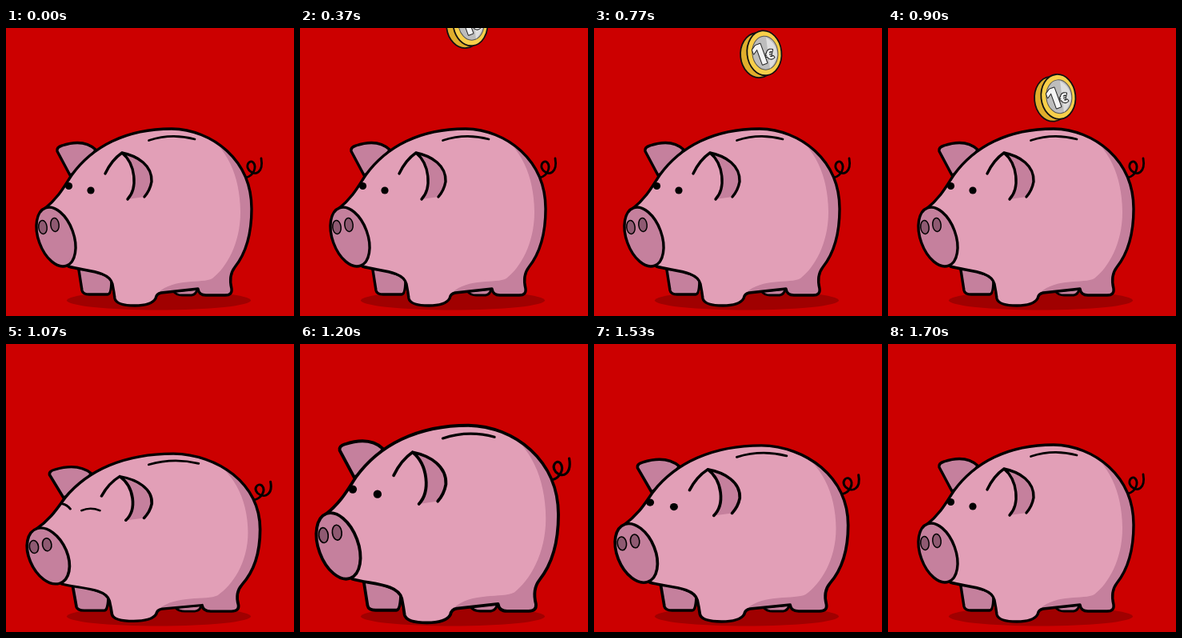
An HTML page that plays this animation: 360x360 px, repeating every 1.81 s.

```html
<!DOCTYPE html>
<html lang="en">
<head>
<meta charset="utf-8">
<title>Piggy bank</title>
<style>
  html, body { margin: 0; width: 100%; height: 100%; overflow: hidden; background: #cc0000; }
  svg { display: block; width: 100vw; height: 100vh; }
  .ink { stroke: #000; stroke-width: 3.4; stroke-linecap: round; stroke-linejoin: round; }
  .thin { stroke-width: 2.8; }
  .line { fill: none; }
  .skin { fill: #e29fb7; }
  .dark { fill: #c5809d; }
  .nostril { fill: #8f5a72; stroke: #000; stroke-width: 1.5; }
  text { font-family: Inter, "Liberation Sans", sans-serif; font-weight: 800; text-anchor: middle;
         fill: #f4f4f4; stroke: #222; stroke-width: 2; paint-order: stroke; stroke-linejoin: round; }
</style>
</head>
<body>
<svg viewBox="0 0 360 360">
  <defs>
    <path id="body" d="M48 226C66 212 74 196 82 184C108 148 150 126 207 126C258 127 307 165 307 226
      C307 262 298 284 286 299C279 308 280 318 282 326Q283 334 274 334H250Q241 334 240 326L194 331
      Q188 332 187 338Q182 347 161 347Q138 347 136 338Q135 330 133 320C129 303 98 304 78 298Z"/>
    <clipPath id="inBody"><use href="#body"/></clipPath>
    <clipPath id="aboveSlot"><path d="M0 -200H360V139H236Q207 131 178 140H0Z"/></clipPath>
  </defs>

  <ellipse cx="191" cy="340.5" rx="115" ry="12" fill="#a00000"/>

  <g id="pig">
    <path class="ink thin line" d="M300 187C309 185 314 174 309 168C304 164 299 172 304 178C312 186 322 180 319 163"/>
    <path class="ink dark" d="M80 184L64 154Q63 149 70 147Q97 138 112 152L100 175Z"/>
    <path class="ink dark" d="M90 296L95 328Q96 333 104 333H127Q132 333 132 312Z"/>
    <path class="ink thin dark" d="M209 329Q213 334 220 334H232Q238 333 239 326Z"/>
    <use href="#body" class="skin"/>
    <path class="dark" clip-path="url(#inBody)"
      d="M244 128Q292 160 293 230C293 270 275 300 258 313C245 320 210 312 190 331V345H320V120Z"/>
    <g id="open">
      <circle cx="78.5" cy="197.5" r="4.6" clip-path="url(#inBody)"/>
      <circle cx="106" cy="203" r="4.6"/>
    </g>
    <path id="shut" class="ink thin line" d="M78 192Q84 193 88 199M101 201Q111 196 122 201"/>
    <use href="#body" class="ink line"/>
    <path class="dark" d="M145 156C165 160 183 172 182 192Q180 203 173 211L152 214C164 200 162 170 145 156"/>
    <path class="ink line" d="M124 182Q132 165 145 156C165 160 183 172 182 192Q180 203 173 211
      M145 156C162 170 165 200 152 214"/>
    <path class="ink thin line" d="M178.500 140.500Q207 131 236 139"/>
    <ellipse class="ink dark" rx="22" ry="38.500" transform="translate(62.500 261) rotate(-20)"/>
    <ellipse class="nostril" rx="5.200" ry="8.500" transform="translate(46 249) rotate(-6)"/>
    <ellipse class="nostril" rx="5.200" ry="8.500" transform="translate(61 246) rotate(-6)"/>
  </g>

  <g clip-path="url(#aboveSlot)">
    <g id="coin" stroke="#111" stroke-width="1.8">
      <g transform="rotate(-6)">
        <ellipse cx="-4" cy="1" rx="22" ry="28" fill="#e0ae2c"/>
        <ellipse cx="4" cy="-1" rx="21.500" ry="28" fill="#f7cf4a"/>
        <ellipse cx="5" cy="-1" rx="16" ry="21" fill="#bdbdbd" stroke="#555" stroke-width="1"/>
      </g>
      <path d="M6 -21Q19 -14 20 1Q17 12 11 18Z" fill="#dedede" stroke="none"/>
      <text font-size="35" transform="translate(2 13) rotate(-20)">1</text>
      <text font-size="16" transform="translate(12 6) rotate(-14)">€</text>
    </g>
  </g>
</svg>
<script>
const LOOP = 1810, STEP = 100 / 3, LAST = 51;
const HOVER_END = 770, IMPACT = 967;
const $ = id => document.getElementById(id);

// Bounce after the coin lands: time in ms, width and height factors.
const bounce = [
  { t: IMPACT, w: 1, h: 1 },
  { t: 1067, w: 1.083, h: 0.947 },
  { t: 1200, w: 1.125, h: 1.116 },
  { t: 1550, w: 1.083, h: 0.995 },
  { t: 1600, w: 1.083, h: 1 },
  { t: 1700, w: 1, h: 1 }
];

const ease = k => (1 - Math.cos(Math.PI * k)) / 2;

function pose(t) {
  const i = bounce.findIndex(p => t < p.t);
  if (i < 1) return bounce[0];
  const a = bounce[i - 1], b = bounce[i], k = ease((t - a.t) / (b.t - a.t));
  return { w: a.w + (b.w - a.w) * k, h: a.h + (b.h - a.h) * k };
}

// Slow glide into view, then free fall.
function coinY(t) {
  const fall = Math.max(0, t - HOVER_END);
  return 33 + 0.0925 * (t - HOVER_END) + 0.0025 * fall * fall;
}

function draw(ms) {
  const t = Math.min(LAST, Math.floor((ms % LOOP + 5) / STEP)) * STEP;
  const shut = t > IMPACT + 20 && t < 1180;
  const { w, h } = pose(t);
  $("pig").setAttribute("transform", `translate(179 335) scale(${w} ${h}) translate(-179 -335)`);
  $("coin").setAttribute("transform", `translate(209 ${coinY(t)})`);
  $("open").style.display = shut ? "none" : "";
  $("shut").style.display = shut ? "" : "none";
}

const start = performance.now();
function tick() {
  draw(performance.now() - start);
  requestAnimationFrame(tick);
}
tick();
</script>
</body>
</html>
```
